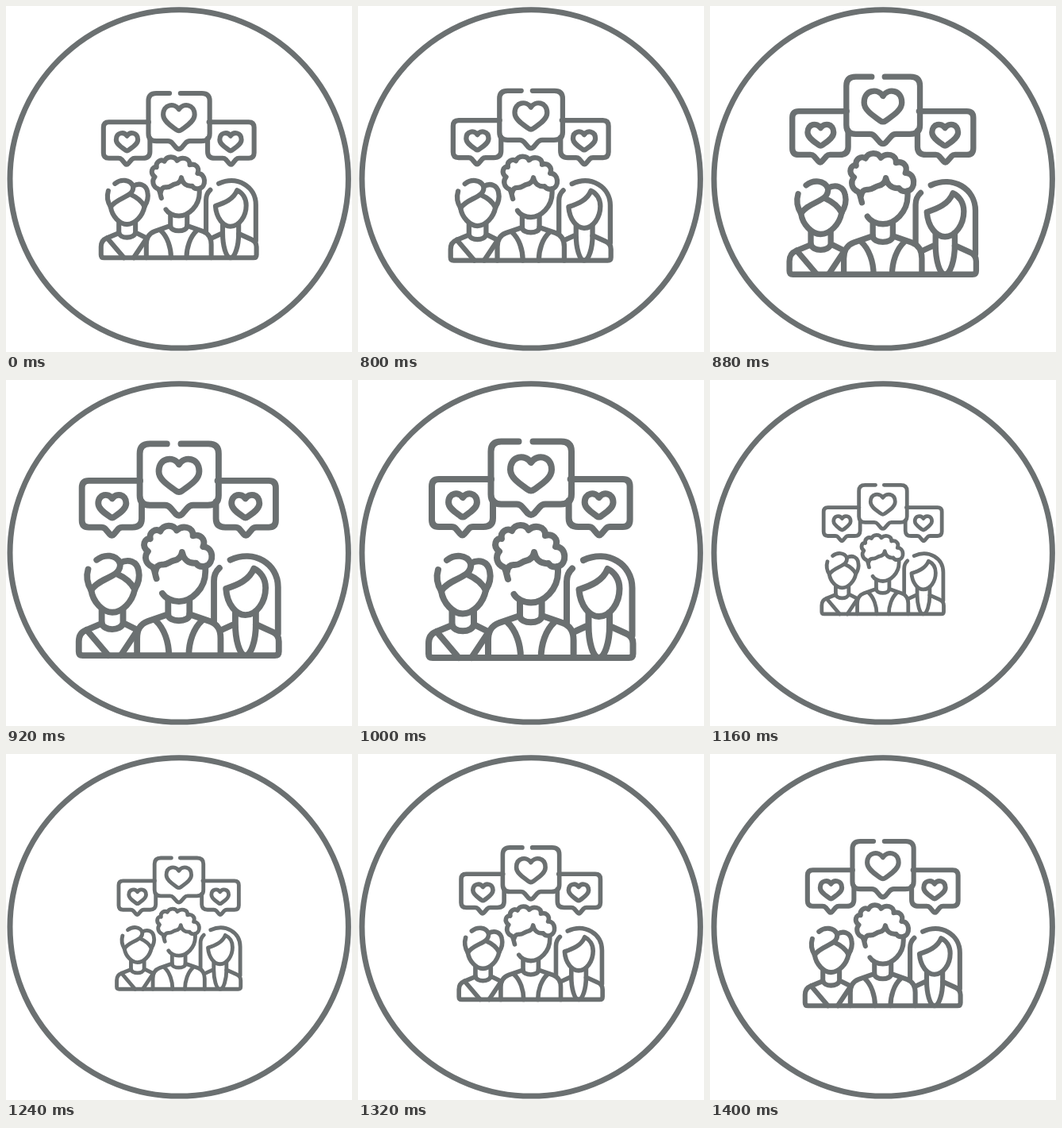
Recreate the animation shown at these times as an HTML page. Size 436 by 436 pixels, loop 2040 ms.

```html
<!DOCTYPE html>
<html lang="en">
<head>
<meta charset="utf-8">
<title>Community icon</title>
<style>
  html, body { margin: 0; height: 100%; overflow: hidden; background: #fff; }
  svg { display: block; width: 100%; height: 100%; }
  svg * { fill: none; stroke: #6b7071; stroke-linecap: round; stroke-linejoin: round; }
</style>
</head>
<body>
<svg viewBox="0 0 436 436">
  <circle cx="218.200" cy="217.900" r="213.200" stroke-width="7"/>
  <g id="icon" stroke-width="8">
    <!-- Half of the symmetric parts: side bubble, suit -->
    <g id="half">
      <path d="M168 125H102Q93 125 93 134V176Q93 185 102 185H118Q121 185 123 187L129 194Q131.500 197 134 194L140 187Q142 185 145 185H158Q170 185 170 174V152"/>
      <path d="M204 278V297L178 306C167 310 164 318 164 328V350M188 305C199 315 205 333 205 350"/>
    </g>
    <use href="#half" transform="matrix(-1 0 0 1 435.600 0)"/>
    <!-- Centre bubble -->
    <path d="M202.500 77.500H180.500Q167.500 77.500 167.500 90V144Q167.500 156.500 180.500 156.500H200Q204 156.500 207 160L214 168Q218 171.500 222 168L229 160Q232 156.500 236 156.500H255Q269 156.500 269 144V90Q269 77.500 256 77.500H220.500"/>
    <g id="hearts"></g>
    <!-- Centre person -->
    <path d="M189 251C187 245 187 240 184 236C174 232 173 222 178 216C169 209 174 198 181 200C179 191 188 186 194 190C198 181 211 181 215 189C222 182 237 184 236 196C245 193 253 200 249 210C263 210 264 232 252 235"/>
    <path d="M188 241C189 235 192 233 196 233C203 234 206 229 211 228C217 227 221 223 222 217C224 227 231 232 240 231C243 236 248 236 252 235V242C252 264 234 280.500 218 280.500C209 280.500 200 276 196.500 270"/>
    <path d="M204 297C204 308 231.600 308 231.600 297"/>
    <!-- Left person -->
    <path d="M101 239C98 249 100 258 105 266C107 281 120 294.500 132 294.500C145 294.500 158 281 161 265C166 257 168 250 166 241C164 229 153 225 142 231"/>
    <path d="M112 227C122 219 137 220 142 231C145 250 115 249 105 266M138 245C147 249 156 255 161 265"/>
    <path d="M118.500 290V309L98 317.500Q89 321 89 332V345Q89 350 94 350H341.500Q346.500 350 346.500 345V332Q346.500 323 338 319.500L317 310"/>
    <path d="M118.500 308C120 319 144 319 146 308V290M146 308L164 317M99 317L127 350M163 320L143 350"/>
    <!-- Right person -->
    <path d="M270 237.500Q263 244 263 254V307M284 227C315 213 345.500 232 345.500 262V322"/>
    <path d="M314.500 238C308.500 253 294 259 278.500 264C280 285 292 298 303.500 298C318 298 329.500 281 329.500 263C329.500 251 323 242 314.500 238Z"/>
    <path d="M290.500 293V309L271 318M317 293V310M290.500 309C290.500 330 296 350 303.500 350C311 350 317 330 317 310"/>
  </g>
</svg>
<script>
const LOOP = 2040, STEP = 40;
const START = 760, SEGMENT = 640 / 3;
const SCALES = [1, 1.34, 0.76, 1];
const DRAWN_SCALE = 1.315;
const CENTRE = [217.5, 213.5];
const icon = document.getElementById("icon");

function heart(x, y, k) {
  const p = (dx, dy) => `${x + dx * k} ${y + dy * k} `;
  return `<path d="M${p(0, 0)}C${p(-7, -11)}${p(-26, -9)}${p(-26, 9)}C${p(-26, 20)}${p(-12, 28)}${p(-4, 34)}`
    + `Q${p(0, 37)}${p(4, 34)}C${p(12, 28)}${p(26, 20)}${p(26, 9)}C${p(26, -9)}${p(7, -11)}${p(0, 0)}Z"/>`;
}

function scaleAt(time) {
  const u = Math.min(Math.max((time - START) / SEGMENT, 0), 3);
  const i = Math.min(Math.floor(u), 2), f = u - i;
  return SCALES[i] + (SCALES[i + 1] - SCALES[i]) * f * f * (3 - 2 * f);
}

function draw() {
  const time = Math.floor((performance.now() % LOOP) / STEP) * STEP;
  const [x, y] = CENTRE;
  icon.setAttribute("transform",
    `translate(${x} ${y}) scale(${scaleAt(time) / DRAWN_SCALE}) translate(${-x} ${-y})`);
  requestAnimationFrame(draw);
}

document.getElementById("hearts").innerHTML =
  heart(218, 104, 1) + heart(132, 148, 0.69) + heart(303.6, 148, 0.69);
draw();
</script>
</body>
</html>
```
